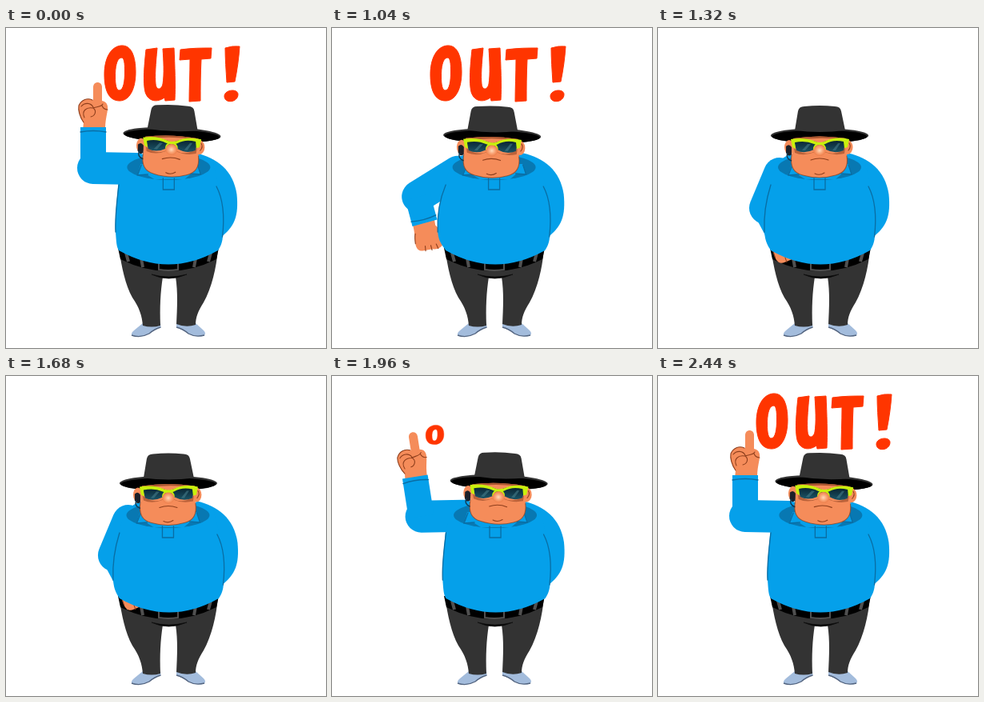
Write an HTML page that moves like this. It is 400 px wide and 400 px high and loops after 2880 ms.

```html
<!DOCTYPE html>
<html lang="en">
<head>
<meta charset="utf-8">
<title>OUT !</title>
<style>
  html, body { margin: 0; width: 100%; height: 100%; overflow: hidden; background: #fff; }
  svg { display: block; width: 100vw; height: 100vh; }
  .shirt { fill: #05a0ea; }
  .seam { fill: none; stroke: #0a6da3; stroke-width: 1.3; stroke-linecap: round; }
  .skin { fill: #f58c5a; }
  .line { fill: none; stroke: #8f3f1d; stroke-width: 1.1; stroke-linecap: round; }
  .cloth { fill: #333; }
  .sole { fill: none; stroke: #53647f; stroke-width: 1.4; }
  #upper { stroke: #05a0ea; stroke-width: 40; stroke-linecap: round; }
  #word path { fill: #ff3500; stroke: #ff3500; stroke-width: 1; stroke-linejoin: round; fill-rule: evenodd; }
</style>
</head>
<body>
<svg viewBox="0 0 400 400" role="img" aria-label="OUT !">
  <defs>
    <radialGradient id="shine">
      <stop offset="0" stop-color="#ffd9b8"/>
      <stop offset=".55" stop-color="#f9a273"/>
      <stop offset="1" stop-color="#ee7f4b"/>
    </radialGradient>
    <linearGradient id="lens" x1="0" y1="0" x2="0" y2="1">
      <stop offset="0" stop-color="#071d2b"/>
      <stop offset="1" stop-color="#1b5466"/>
    </linearGradient>
  </defs>

  <g id="word">
    <path d="M144 22C157 21 162 36 162 55C162 77 154 91 142 91C128 91 123 77 123 58C123 38 131 23 144 22ZM144 37C138 38 136.500 50 136.500 60C136.500 72 138 78 142 78C147 77 148.500 66 148.500 55C148.500 44 148 37 144 37Z"/>
    <path d="M175 27L189 25C187 45 186 60 187 70C188 78 194 78 196 70C198 58 197 40 196 26L210 25C211 45 212 75 211 90L199 91L198 87C190 93 178 93 174 80C171 68 173 45 175 27Z"/>
    <path d="M218 27C232 25 245 25 257 25L256 38L244 39C243 58 243 75 243 91L229 92C229 75 230 58 230 39L217 40Z"/>
    <path d="M274 25Q283 22 292 23C291 38 289 52 286 67L276 68C275 52 274 38 274 25ZM273 86C272 77 290 75 290 83C290 93 274 95 273 86Z"/>
  </g>

  <!-- shoes, trousers, belt -->
  <g fill="#a3bcdc">
    <path d="M171 369L193 369L193.500 374Q186 376 179 382Q168 388 158 385Q155 382 160 378Z"/>
    <path d="M213 369L237 369L247 378Q251 382 247 385Q237 387 228 382Q221 376 213 374Z"/>
  </g>
  <path class="sole" d="M157 384Q168 388 179 382Q186 376 193.500 374M213 374Q221 376 228 382Q237 387 248 384"/>
  <path class="cloth" d="M141 276C145 300 149 321 158 337C167 350 170 360 171 372Q182 375 193 372C192 350 193 330 196 311L212 311C215 330 214 350 213 370Q225 375 237 371C237 362 240 354 247 343C257 325 263 300 265 276Z"/>
  <path d="M182 308Q203 318 226 308Q203 314 182 308Z" stroke="#111" stroke-width=".8"/>
  <path d="M140 275L143 289Q203 319 263 289L266 275Z"/>
  <g fill="none" stroke="#505050">
    <path d="M150 281l3 11M169 288l2 11M237 288l-2 11M256 281l-3 11" stroke-width="4"/>
    <path d="M191 294V302Q203 304 215 302V294" stroke-width="2"/>
  </g>

  <!-- moving arm -->
  <g id="arm">
    <line id="upper"/>
    <g id="forearm">
      <g id="hand">
        <path id="finger" class="skin" d="M0 -22V-50C0 -58 11 -58 11 -50V-22Z"/>
        <path class="skin" d="M-13 4L-12 -6C-17 -13 -19 -22 -18 -27C-15 -34 -8 -37 -1 -34L10 -33C16 -33 19 -28 18 -22C17 -14 15 -9 15 4Z"/>
        <g id="curl" class="line">
          <path d="M-12 -6C-17 -13 -19 -22 -18 -27C-15 -34 -8 -37 -1 -34"/>
          <path d="M-15 -26C-11 -31 -3 -31 0 -25M-11 -12C-15 -21 -8 -25 -1 -24C5 -26 10 -25 12 -29M0 -24C5 -20 2 -14 -3 -13M11 -27Q13 -22 18 -22"/>
        </g>
        <path id="knuckles" class="line" d="M-8 -35l1 6M0 -35v6M8 -34l-1 6M18 -22q-1 8 -3 12"/>
      </g>
      <rect id="sleeve" class="shirt" x="-16"  width="32"/>
      <path id="cuff" class="seam" d="M-16 6Q0 3 16 6"/>
    </g>
  </g>

  <!-- torso -->
  <g id="body">
    <path class="shirt" d="M236 156C264 162 284 178 288.500 208C291 235 286 248 268 262Z"/>
    <path id="torso" class="shirt"/>
    <path id="crease" class="seam"/>
    <path class="seam" d="M263 198C272 215 273.500 235 270.500 261"/>
  </g>

  <g id="neck">
    <ellipse cx="202" cy="174" rx="52" ry="16" fill="#0878b2"/>
    <path class="shirt" d="M167 170L163 184L176 184L184 189L222 189L229 183L242 183L238 170Z"/>
    <path class="seam" d="M168 171L163 184L176 183M238 171L242 183L229 182M195 188V202H209V188"/>
  </g>

  <!-- head, with the face in front of the brim -->
  <g id="head">
    <ellipse class="cloth" cx="202" cy="134.500" rx="61" ry="9.500"/>
    <ellipse cx="202" cy="135.500" rx="59.500" ry="8"/>
    <path class="cloth" d="M171 128L175 104Q176 98 183 98Q202 96 221 98Q228 98 229 104L234 128Q202 132 171 128Z"/>
    <ellipse class="skin" cx="164" cy="149" rx="6" ry="9"/>
    <ellipse class="skin" cx="237" cy="149" rx="6.500" ry="9"/>
    <path class="line" d="M239 144q3 4 -1 9"/>
    <path class="skin" d="M169 138Q202 133 235 138L236 160C238 173 234 181 222 184Q202 190 181 184C169 181 165 173 167 160Z"/>
    <path class="line" d="M167 158C165 173 169 181 181 184Q202 190 222 184C234 181 238 173 236 160" opacity=".7"/>
    <path d="M169 138Q202 133 235 138V140Q202 135 169 141Z" fill="#ad5730"/>
    <path d="M170 150Q183 161 197 154L207 154Q222 161 234 150L233 157Q220 160 208 155H196Q182 161 171 156Z" fill="#a9552f" opacity=".75"/>
    <path d="M160 148q4 -4 7 1l0 9q-4 4 -7 -2z" fill="#1d2028"/>
    <path d="M162 156q-3 7 5 10" fill="none" stroke="#123b55" stroke-width="1.500"/>
    <path d="M170 142Q183 137 197 142Q202 145 208 142Q222 136 235 141L232 153Q221 158 210 152L195 152Q183 158 173 153Z" fill="url(#lens)"/>
    <path d="M166 139Q184 136 197 142Q202 144 208 142Q221 135 239 139L237 149L233 150L232 142Q219 139 209 145Q202 148 195 145Q184 140 171 143L172 151L168 149Z" fill="#c9f00d"/>
    <path d="M180 153l7 -8h4l-7 8zM218 153l7 -9h3l-6 9z" fill="#4f8894" opacity=".5"/>
    <path d="M195 152Q195 145 202 145Q209 145 209 152" fill="none" stroke="#c9f00d" stroke-width="2"/>
    <ellipse cx="202" cy="153" rx="7.500" ry="7" fill="url(#shine)"/>
    <path class="line" d="M191 165Q202 161 213 165" stroke-width="1.600"/>
    <path class="line" d="M196 182Q202 185 208 181"/>
  </g>
</svg>

<script>
const $ = id => document.getElementById(id);
const set = (id, attrs) => Object.entries(attrs).forEach(([k, v]) => $(id).setAttribute(k, v));
const clamp = p => Math.max(0, Math.min(1, p));
const part = (t, from, to) => clamp((t - from) / (to - from));
const smooth = p => p * p * (3 - 2 * p);
const move = (x, y) => `translate(${x} ${y})`;

const LOOP = 2880, STEP = 40;

// turn is the forearm's bearing in degrees, side the left edge of the torso
const UP   = { sx: 163, sy: 176, ex: 109, ey: 175, reach: 51, turn: 0,    hx: 4.5,  hy: -1, tilt: 2, side: 136 };
const HIP  = { sx: 156, sy: 181, ex: 106, ey: 212, reach: 35, turn: -195, hx: -3.5, hy: 1,  tilt: 1, side: 130 };
const BACK = { sx: 152, sy: 182, ex: 134, ey: 225, reach: 42, turn: -208, hx: 0,    hy: 0,  tilt: 0, side: 132 };
const MOVES = [[840, 1040, HIP], [1040, 1320, BACK], [1680, 2000, UP]];

const POP_AT = 1960, POP_GAP = 80, POP_MS = 240, EXIT_AT = 1120, EXIT_MS = 160;
const letters = [...document.querySelectorAll('#word path')].map(el => {
  const { x, y, width, height } = el.getBBox();
  return { el, cx: x + width / 2, cy: y + height / 2 };
});

function blend(a, b, p) {
  return Object.fromEntries(Object.keys(a).map(k => [k, a[k] + (b[k] - a[k]) * p]));
}

const poseAt = t => MOVES.reduce((pose, [from, to, next]) =>
  blend(pose, next, smooth(part(t, from, to))), UP);

// The body leans to the right while the arm is busy
function leanAt(t) {
  if (t >= 840 && t < 1320) return 1.5 * Math.cos(part(t, 840, 1320) * Math.PI / 2);
  return 1.5 * Math.sin(part(t, 1480, 2440) * Math.PI);
}

function drawArm({ sx, sy, ex, ey, reach, turn }, lean) {
  const facing = Math.cos(turn * Math.PI / 180);
  const length = reach * (.25 + .75 * Math.abs(facing));
  const finger = Math.max(0, facing);
  set('arm', { transform: move(lean, -lean) });
  set('upper', { x1: sx, y1: sy, x2: ex, y2: ey });
  set('forearm', { transform: `${move(ex, ey)} rotate(${turn})` });
  set('sleeve', { y: -length, height: length });
  set('cuff', { transform: move(0, -length) });
  set('hand', { transform: move(0, -length) });
  set('finger', { transform: `translate(0 -24) scale(1 ${finger}) translate(0 24)` });
  set('curl', { opacity: finger });
  set('knuckles', { opacity: 1 - finger });
}

function drawBody({ side, hx, hy, tilt }, lean) {
  const flank = `C${side + 3} 215 ${side} 235 ${side + 1} 255`;
  set('torso', { d: `M165 158C148 164 143 182 140 198${flank}` +
    `C${side + 2} 268 138 273 141 278Q203 313 265 278C269 272 271 266 271 258` +
    'C274 235 272 215 266 198L258 165L238 158Z' });
  set('crease', { d: `M141 196${flank}` });
  set('body', { transform: move(lean, 0) });
  set('neck', { transform: move(lean * .5 + Math.max(0, hx) * .3, 0) });
  set('head', { transform: `${move(hx + lean, hy - lean * .5)} rotate(${tilt} 202 160)` });
}

// Letters spring out from the fingertip one after another
function drawWord(t) {
  letters.forEach(({ el, cx, cy }, i) => {
    const age = t - POP_AT - i * POP_GAP;
    const gone = age < 0 ? part(t, EXIT_AT, EXIT_AT + EXIT_MS) : 0;
    const swing = age >= 0 && age < POP_MS ? Math.exp(-age / 50) * Math.cos(age * Math.PI / 100) : 0;
    const sx = (1 - .42 * swing) * (1 - gone), sy = (1 - .65 * swing) * (1 - gone);
    el.style.visibility = gone < 1 ? 'visible' : 'hidden';
    el.setAttribute('transform',
      `${move(cx - 14 * swing, cy + 17 * swing)} scale(${sx} ${sy}) ${move(-cx, -cy)}`);
  });
}

function draw(time) {
  const t = Math.floor((time % LOOP) / STEP) * STEP;
  const pose = poseAt(t), lean = leanAt(t);
  drawArm(pose, lean);
  drawBody(pose, lean);
  drawWord(t);
}

const begin = performance.now();
function tick() {
  draw(performance.now() - begin);
  requestAnimationFrame(tick);
}
tick();
</script>
</body>
</html>
```
